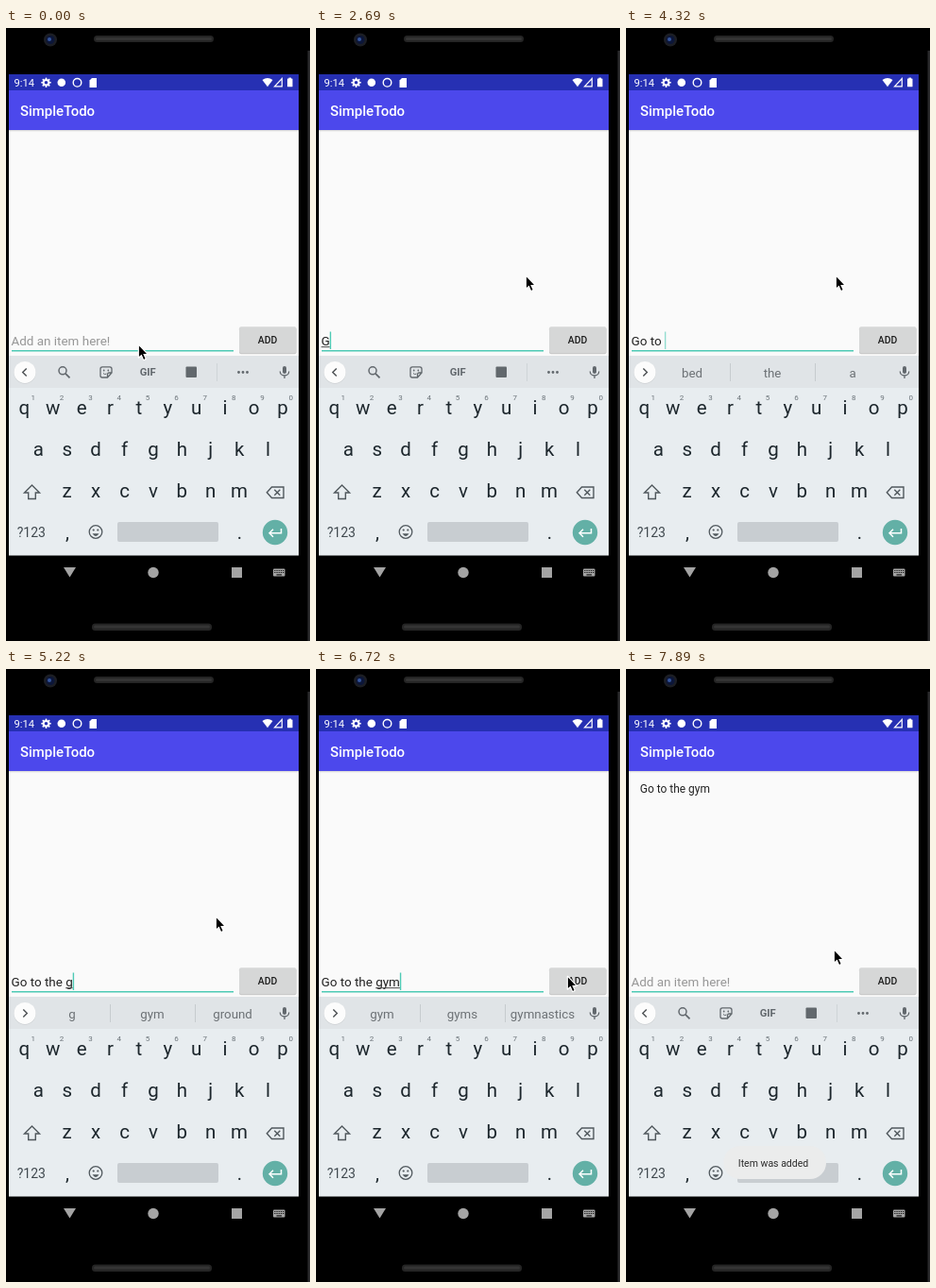
Recreate the animation shown at these times as an HTML page with a canvas. Size 322 by 649 pixels, loop 8 s.

```html
<!DOCTYPE html>
<html lang="en">
<head>
<meta charset="utf-8">
<title>Todo app</title>
<style>
html, body { margin: 0; width: 100%; height: 100%; overflow: hidden; background: #000; }
canvas { display: block; width: 322px; height: 649px; }
</style>
</head>
<body>
<canvas id="stage"></canvas>
<script>
const LOOP = 8000, W = 322, H = 649, TEAL = '#4ecab5', ICON = '#62686d';
const canvas = document.getElementById('stage');
const ratio = window.devicePixelRatio || 1;
canvas.width = W * ratio;
canvas.height = H * ratio;
const c = canvas.getContext('2d');
c.scale(ratio, ratio);

// Each step changes part of the state from its time (ms) on.
const steps = [
  [0, { text: '', compose: 0, caret: 0, words: null, mouse: [140, 335], press: 0, item: 0, toast: 0 }],
  [150, { caret: 1 }],
  [450, { mouse: [152, 324] }],
  [600, { mouse: [194, 288], caret: 0 }],
  [740, { mouse: [222, 262] }],
  [1190, { caret: 1 }],
  [1640, { caret: 0 }],
  [2090, { caret: 1 }],
  [2690, { text: 'G', compose: 1 }],
  [2840, { words: ['G', '*Go', 'Get'] }],
  [3290, { caret: 0 }],
  [3730, { text: 'Go', compose: 2, caret: 1 }],
  [3880, { words: ['Go', '*Good', 'Going'] }],
  [4030, { text: 'Go ', compose: 0, words: ['to', 'ahead', 'back'] }],
  [4170, { text: 'Go to', compose: 2, words: ['too', '*to', 'tomorrow'] }],
  [4320, { text: 'Go to ', compose: 0, caret: .6, words: ['bed', 'the', 'a'] }],
  [4470, { text: 'Go to t', compose: 1, caret: 1, words: ['t', '*to', 'the'] }],
  [4620, { text: 'Go to th', compose: 2, words: ['th', '*the', 'that'] }],
  [4770, { text: 'Go to the', compose: 3, words: ['the', 'then', 'they'] }],
  [4920, { text: 'Go to the ', compose: 0, words: ['first', 'next', 'best'] }],
  [5220, { text: 'Go to the g', compose: 1, words: ['g', 'gym', 'ground'] }],
  [5370, { text: 'Go to the gy', compose: 2, words: ['gy', '*gym', 'guys'] }],
  [5670, { text: 'Go to the gym', compose: 3, words: ['gym', 'gyms', 'gymnastics'] }],
  [6120, { mouse: [228, 276] }],
  [6270, { mouse: [242, 297], caret: 0 }],
  [6420, { mouse: [257, 315] }],
  [6570, { mouse: [266, 325] }],
  [6720, { caret: 1 }],
  [7020, { press: 1 }],
  [7160, { press: 0, text: '', compose: 0, mouse: [232, 305] }],
  [7310, { mouse: [220, 297], words: null, item: 1 }],
  [7460, { toast: .4 }],
  [7600, { toast: .8 }],
  [7750, { toast: 1, caret: 0 }]
];

const stateAt = t => Object.assign({}, ...steps.filter(s => s[0] <= t).map(s => s[1]));

function box(x, y, w, h, color, r = 0) {
  c.fillStyle = color;
  c.beginPath();
  c.roundRect(x, y, w, h, r);
  c.fill();
}

function disc(x, y, r, color) {
  c.fillStyle = color;
  c.beginPath();
  c.arc(x, y, r, 0, 7);
  c.fill();
}

function ring(x, y, r, color, width) {
  c.strokeStyle = color;
  c.lineWidth = width;
  c.beginPath();
  c.arc(x, y, r, 0, 7);
  c.stroke();
}

function shape(d, fill, stroke, width = 1.4) {
  const p = new Path2D(d);
  if (fill) { c.fillStyle = fill; c.fill(p); }
  if (stroke) { c.strokeStyle = stroke; c.lineWidth = width; c.stroke(p); }
}

function font(size, weight = 400) {
  c.font = `${weight} ${size}px Roboto, sans-serif`;
}

function label(s, x, y, size, color, align = 'left', weight = 400) {
  font(size, weight);
  c.textAlign = align;
  c.fillStyle = color;
  c.fillText(s, x, y);
}

function drawPhone() {
  box(0, 0, W, H, '#000');
  box(319.5, 24, 2.5, 625, '#29292b');
  box(93, 8, 127, 7, '#252525', 3.5);
  box(95, 10, 123, 3, '#343434', 1.5);
  box(91, 630.5, 127, 7.5, '#252525', 3.5);
  box(93, 632.5, 123, 3, '#343434', 1.5);
  disc(47, 12.5, 7, '#1c1e24');
  disc(47, 12.5, 4.5, '#0c1638');
  disc(46, 12, 2, '#36569c');
  shape('M61 571H74L67.5 581.5Z', '#a4a4a4');
  disc(156, 576.5, 5.7, '#a4a4a4');
  box(239, 571, 11, 11, '#a4a4a4');
  box(283, 572.5, 12.5, 8, '#a4a4a4', 1);
  for (let i = 0; i < 5; i++) {
    box(284.3 + i * 2.2, 574, 1.1, 1.1, '#000');
    box(284.3 + i * 2.2, 576, 1.1, 1.1, '#000');
  }
  box(286.5, 578.4, 5.5, 1, '#000');
}

function drawAppBar() {
  box(3, 49, 307, 17, '#2630b3');
  box(3, 66, 307, 42, '#4c48ec');
  label('9:14', 8.5, 61.7, 11.2, '#fff');
  ring(42.5, 57.7, 2.8, '#fff', 2);
  for (let i = 0; i < 8; i++) {
    const a = i * Math.PI / 4;
    disc(42.5 + 4.3 * Math.cos(a), 57.7 + 4.3 * Math.sin(a), 1, '#fff');
  }
  disc(58.8, 57.8, 4.3, '#fff');
  ring(75.5, 57.8, 4.3, '#fff', 1.4);
  shape('M91 53H96V63H88.5V55.5Z', '#fff');
  shape('M271.5 55Q277 51 282.5 55L277 62.3Z', '#fff');
  shape('M292.3 53.5V61.8H284.5Z', null, '#fff', 1.2);
  box(298, 53.5, 5.5, 8.8, '#fff', .6);
  box(299.5, 52.6, 2.5, 1.5, '#fff');
  label('SimpleTodo', 15, 93, 14.95, '#fff', 'left', 500);
}

function drawContent(s) {
  box(3, 108, 307, 240, '#fafafa');
  box(3, 108, 307, 1, '#dcdcdc');
  box(3, 109, 307, 1, '#f0f0f0');
  if (s.item) label('Go to the gym', 14.8, 130.8, 11.95, '#222');

  const left = 5.5, base = 336;
  label(s.text || 'Add an item here!', left, base, 13.45, s.text ? '#222' : '#979797');
  const end = left + (s.text ? c.measureText(s.text).width : 0);
  if (s.compose) {
    const w = c.measureText(s.text.slice(-s.compose)).width;
    box(end - w, 337.2, w, 1, '#444');
  }
  box(6, 341, 235, 1.6, TEAL);
  c.globalAlpha = s.caret;
  box(end, 321.5, 1.4, 18.5, TEAL);
  c.globalAlpha = 1;

  box(247, 317.2, 60.5, 28, '#c9c9c9', 2);
  box(247, 316.3, 60.5, 27.8, s.press ? '#bfc0c0' : '#d6d7d7', 2);
  label('ADD', 277, 334.1, 10.45, '#1d1d1d', 'center', 500);
}

function drawToolIcons() {
  ring(60, 362.8, 4, ICON, 1.5);
  shape('M63 365.8L67.5 370.3', null, ICON, 1.8);
  shape('M102 358.8H110Q112 358.8 112 361V365L107.5 370H102Q100 370 100 368V361Q100 358.8 102 358.8ZM112 365H109Q107.5 365 107.5 367V370', null, ICON, 1.3);
  disc(103.7, 362.5, .9, ICON);
  disc(108.3, 362.5, .9, ICON);
  shape('M103 365.5Q104.5 367.5 106.5 366', null, ICON, 1);
  label('GIF', 150.2, 368.3, 11.2, ICON, 'center', 700);
  box(190.5, 358.5, 11.5, 11.5, ICON, 1);
  box(223, 355, 1, 19, '#cfd4d7');
  for (const x of [246.5, 251, 255.5]) disc(x, 364.5, 1.4, ICON);
}

function drawToolbar(words) {
  box(3, 347, 307, 34, '#e0e4e7');
  disc(20, 365, 11.7, '#cdd1d4');
  disc(20, 364.4, 11.5, '#fcfcfc');
  shape(words ? 'M18.3 360.4L22.3 364.4L18.3 368.4' : 'M21.7 360.4L17.7 364.4L21.7 368.4', null, '#4c5053');
  if (words) {
    words.forEach((word, i) => {
      const bold = word[0] === '*';
      label(word.replace('*', ''), 70 + 85 * i, 369.6, 13.3, bold ? '#111' : '#6c7175', 'center', bold ? 700 : 400);
    });
    box(110, 355, 1, 19, '#c6cbce');
    box(200, 355, 1, 19, '#c6cbce');
  } else drawToolIcons();
  box(293, 358, 4, 8, ICON, 2);
  shape('M290.3 363.5C290.3 369.5 299.7 369.5 299.7 363.5M295 368V371', null, ICON, 1.3);
}

function drawKeys() {
  box(3, 381, 307, 177.5, '#e8edf0');
  [['qwertyuiop', 19.3, 409], ['asdfghjkl', 34.3, 453], ['zxcvbnm', 64.7, 497]].forEach(([row, x, y]) =>
    [...row].forEach((k, i) => label(k, x + i * 30.4, y, 20.5, '#1d272d', 'center')));
  [...'1234567890'].forEach((n, i) => label(n, 28.7 + i * 30.35, 394.3, 8, '#6a7278', 'center'));

  shape('M27.5 484L35.5 492H31.3V498.5H23.7V492H19.5Z', null, '#50585d', 1.4);
  shape('M281.5 486H294V497.5H281.5L276.3 491.7ZM284.3 488.8L290.3 494.8M290.3 488.8L284.3 494.8', null, '#50585d', 1.4);
  label('?123', 26.8, 538.5, 14, '#3f484e', 'center');
  label(',', 65, 541, 20, '#1d272d', 'center');
  label('.', 247.3, 541, 20, '#1d272d', 'center');
  ring(95, 533.5, 6.8, '#50585d', 1.3);
  disc(92.7, 531.5, 1.1, '#50585d');
  disc(97.3, 531.5, 1.1, '#50585d');
  shape('M91.5 535.3Q95 540.5 98.5 535.3Z', '#50585d');
  box(118, 523, 107, 21, '#c8cdd1', 2);
  disc(285, 534, 13.2, '#63b0a6');
  shape('M291.5 530V534.7H279.5M283 530.7L279 534.7L283 538.7', null, '#fff', 1.5);
}

function drawToast(alpha) {
  c.globalAlpha = alpha;
  box(103.5, 505, 108.5, 35, '#ebecec', 17);
  label('Item was added', 156, 526.7, 10.5, '#2b2b2b', 'center');
  c.globalAlpha = 1;
}

function drawMouse([x, y]) {
  c.save();
  c.translate(x, y);
  c.lineJoin = 'round';
  shape('M.5 .5V14L3.6 11.2L5.8 16.3L8 15.4L5.8 10.4H10Z', '#000', '#fff', 1.6);
  shape('M.9 1.4V13L3.6 10.6L5.9 15.8L7.5 15.1L5.2 10H9Z', '#000');
  c.restore();
}

function frame() {
  const s = stateAt(performance.now() % LOOP);
  drawPhone();
  drawAppBar();
  drawContent(s);
  drawToolbar(s.words);
  drawKeys();
  drawToast(s.toast);
  drawMouse(s.mouse);
  requestAnimationFrame(frame);
}
frame();
</script>
</body>
</html>
```
